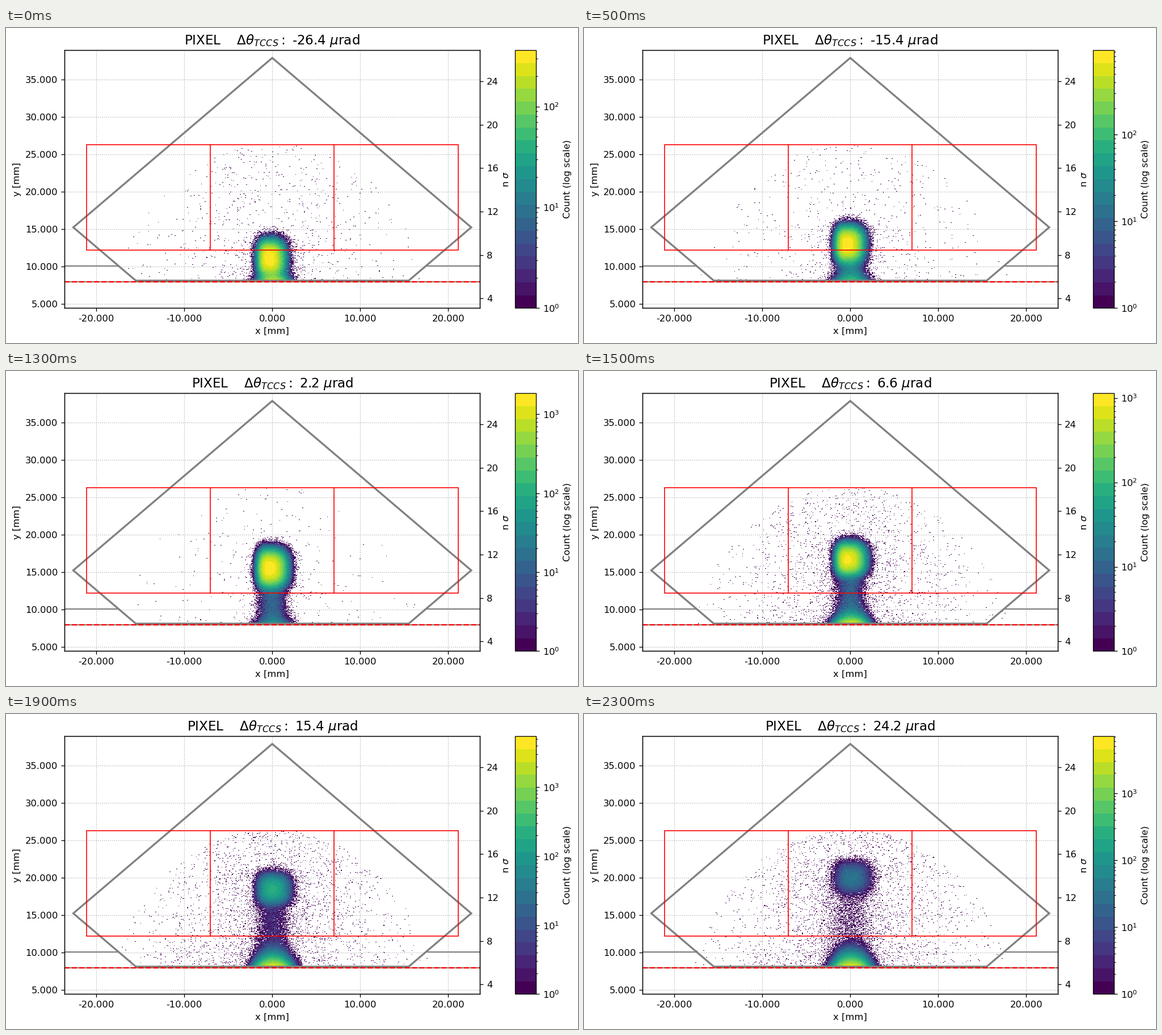
Recreate the animation shown at these times as a matplotlib script. Size 1008 px wide and 556 px high, loop 2.4 s.

```python
import numpy as np
import matplotlib.pyplot as plt
from matplotlib.animation import FuncAnimation
from matplotlib.colors import LogNorm
from matplotlib.patches import Polygon, Rectangle
from matplotlib.ticker import FormatStrFormatter

W, H, DPI = 1008, 556, 118
FRAMES, STEP_MS = 24, 100
plt.rcParams.update({"font.family": "DejaVu Sans", "font.size": 10})

EDGE = 0.2            # expected count at the rim of a shape
Y_MIN = 8.1
LOSS_STEP = 13        # from here on the beam leaves the channel
X_EDGES = np.linspace(-19.5, 19.5, 391)
Y_EDGES = Y_MIN + np.arange(243) / 13.22
GX, GY = np.meshgrid((X_EDGES[1:] + X_EDGES[:-1]) / 2,
                     (Y_EDGES[1:] + Y_EDGES[:-1]) / 2)


def growth(i):
    """How far the beam has returned to the core, 0 to 1."""
    return 1 - np.exp(-max(0, i - LOSS_STEP) / 2.2)


def peaks(i):
    """Log10 of the peak counts in spot, neck and core."""
    late = max(0, i - LOSS_STEP)
    spot = 2.53 + 0.1 * i - 0.0035 * i ** 2 - 0.145 * late
    neck = 1.45 - 0.027 * i - 0.011 * late ** 2
    core = 2.4 - 0.045 * min(i, LOSS_STEP) + 2.03 * growth(i)
    return spot, neck, core


def spot_centre(i):
    x = -0.45 + 0.55 / (1 + np.exp((18 - i) / 1.5))
    y = 11.2 + 0.385 * i - 0.9 * np.exp(-((i - 11) / 3.5) ** 2)
    return x, y


def falloff(peak, r):
    """Drop from the peak to EDGE as r goes from 0 to 1."""
    return peak * np.exp(-np.log(peak / EDGE) * r)


def density(i):
    """Expected counts: deflected spot, neck below it and beam core."""
    a_spot, a_neck, a_core = (10 ** a for a in peaks(i))
    x, y = spot_centre(i)
    dx, dy = GX - x, GY - y
    wx = np.where(dx < 0, x + 2.5, 2.55 + 0.025 * i - x)
    wy = np.where(dy < 0, 4 - growth(i), 15.1 + 0.345 * i - y)
    r = np.abs(dx / wx) ** 2.6 + np.abs(dy / wy) ** 2.6
    spot = falloff(a_spot, r ** 0.9)
    neck = falloff(a_neck, np.abs(GX / 2.05) ** 2.3)
    neck = neck / (1 + np.exp(dy / 0.5))
    core_w = 3.05 + 0.5 * growth(i)
    core = falloff(a_core, np.abs((GX - 0.1) / core_w) ** 2.2)
    return spot + neck + core * np.exp(-2.25 * (GY - Y_MIN))


def strays(rng, i):
    n = int(750 - 38 * min(i, LOSS_STEP) + 2500 * growth(i))
    x = rng.normal(0, 7.5, 3 * n)
    y = Y_MIN + 18.2 * rng.random(3 * n) ** 1.2
    inside = (x / 19) ** 2 + (y / 26.5) ** 2 < 1
    x, y = x[inside][:n], y[inside][:n]
    m = 150 + n // 3
    x = np.append(x, rng.normal(0, 2.4, m))
    y = np.append(y, rng.uniform(Y_MIN, spot_centre(i)[1] + 2.5, m))
    return np.histogram2d(y, x, bins=(Y_EDGES, X_EDGES))[0]


def counts(i):
    rng = np.random.default_rng(100 + i)
    hits = rng.poisson(density(i)) + strays(rng, i)
    return np.ma.masked_less(hits, 1), 10 ** (max(peaks(i)) + 0.03)


def box(left, top, right, bottom):
    return [left / W, 1 - bottom / H, (right - left) / W, (bottom - top) / H]


fig = plt.figure(figsize=((W + 1e-6) / DPI, (H + 1e-6) / DPI), dpi=DPI,
                 facecolor="white")
ax = fig.add_axes(box(103, 39, 835.4, 494.5))
cax = fig.add_axes(box(897.4, 39, 934.4, 494.5))

hits, top = counts(0)
image = ax.imshow(hits, cmap=plt.get_cmap("viridis", 20),
                  norm=LogNorm(1, top), origin="lower",
                  extent=(X_EDGES[0], X_EDGES[-1], Y_EDGES[0], Y_EDGES[-1]),
                  aspect="auto", interpolation="nearest", zorder=0.6)
fig.colorbar(image, cax=cax).set_label("Count (log scale)")

X_LIM = 23.63
ax.set_xlim(-X_LIM, X_LIM)
ax.set_ylim(4.47, 38.93)
ax.set_xticks(range(-20, 21, 10))
ax.set_yticks(range(5, 36, 5))
for axis in (ax.xaxis, ax.yaxis):
    axis.set_major_formatter(FormatStrFormatter("%.3f"))
ax.set_xlabel("x [mm]")
ax.set_ylabel("y [mm]")
ax.set_axisbelow(True)
ax.grid(linestyle=":")

sigma = ax.twinx()
sigma.set_ylim(3.113, 26.87)
sigma.set_yticks(range(4, 25, 4))
sigma.set_ylabel(r"n $\sigma$")

# Detector window: a square on its corner with the lower tip cut off
MID, HALF, CUT = 15.26, 16 * 2 ** 0.5, 8.15
foot = HALF - (MID - CUT)
ax.add_patch(Polygon([(0, MID + HALF), (HALF, MID), (foot, CUT),
                      (-foot, CUT), (-HALF, MID)],
                     fill=False, edgecolor="gray", linewidth=2, zorder=2))

SHELF, LIMIT = 10.1, 7.96
rim = HALF - (MID - SHELF)
for side in (-1, 1):
    ax.plot([side * X_LIM, side * rim], [SHELF, SHELF], color="gray",
            linewidth=1.2, zorder=2)
ax.axhline(LIMIT, color="gray", linewidth=1.2, zorder=2)
ax.axhline(LIMIT, color="red", linewidth=1.5, linestyle="--", zorder=2.2)

# Three sensor chips side by side
CHIP, CHIP_Y = 14.08, 12.22
red = dict(color="red", linewidth=1, zorder=2.1)
ax.add_patch(Rectangle((-1.5 * CHIP, CHIP_Y), 3 * CHIP, CHIP, fill=False,
                       **red))
for x in (-CHIP / 2, CHIP / 2):
    ax.plot([x, x], [CHIP_Y, CHIP_Y + CHIP], **red)

title = ax.set_title("", fontsize=14)


def draw(i):
    data, vmax = counts(i)
    image.set_data(data)
    image.set_clim(1, vmax)
    angle = -26.4 + 2.2 * i
    title.set_text(r"PIXEL    $\Delta\theta_{TCCS}:$ "
                   + f"{angle:.1f}" + r" $\mu$rad")
    return image, title


anim = FuncAnimation(fig, draw, frames=FRAMES, interval=STEP_MS,
                     repeat=True, repeat_delay=0, blit=False)
plt.show()
```
